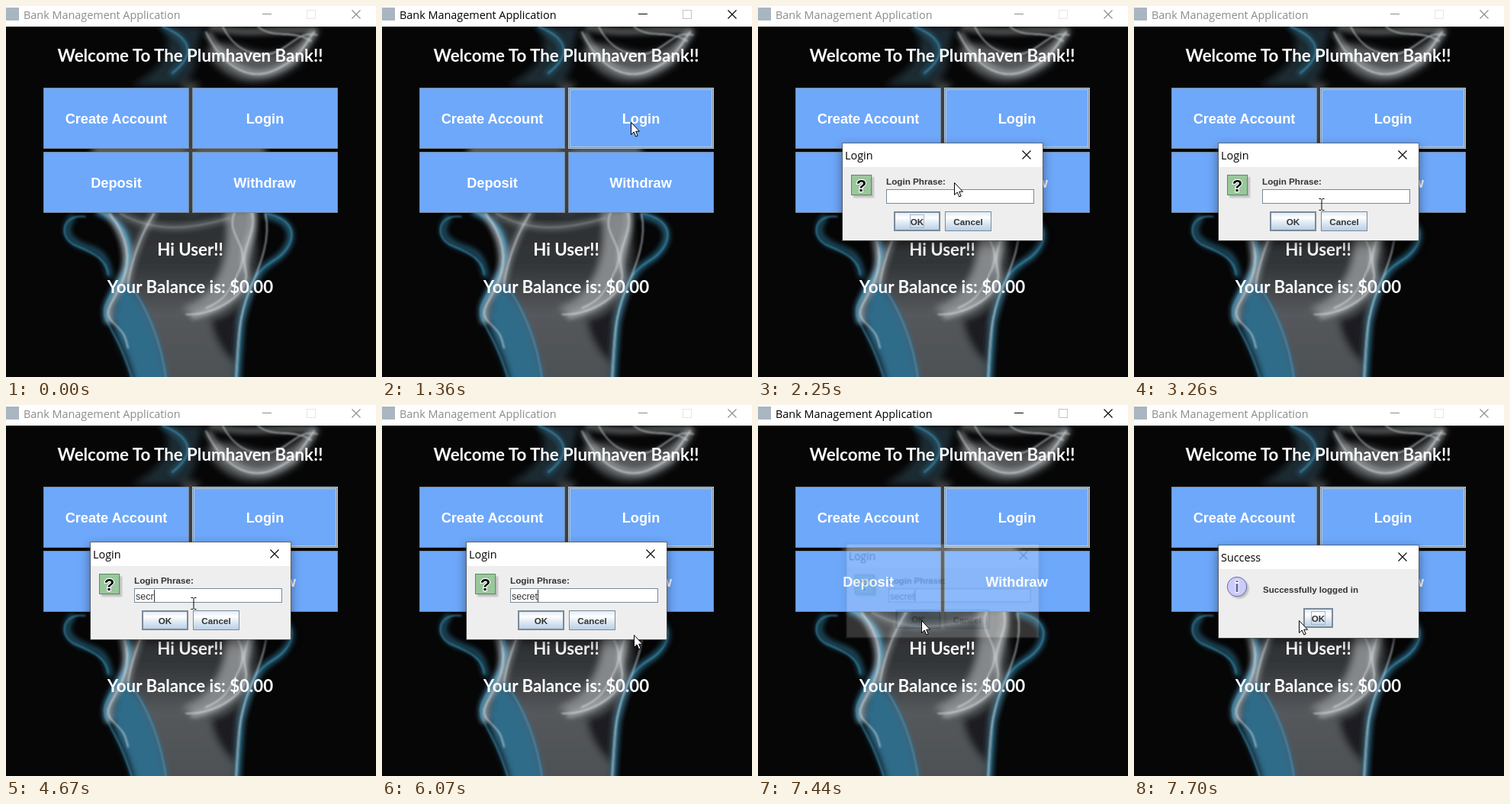
Recreate the animation shown at these times as an HTML page. Size 485 by 486 pixels, loop 8000 ms.

```html
<!DOCTYPE html>
<html lang="en">
<head>
<meta charset="utf-8">
<title>Bank Management Application</title>
<style>
  html, body { margin: 0; width: 100%; height: 100%; overflow: hidden; background: #000; }
  svg { display: block; width: 485px; height: 486px; }

  .ui { font: 14.4px "Open Sans", "Noto Sans", sans-serif; }
  .head { font: 700 22.3px Lato, sans-serif; fill: #fff; text-anchor: middle; }
  .btn { font: 700 18.2px "Liberation Sans", Arial, sans-serif; fill: #fff; text-anchor: middle; }
  .label { font: 700 11.7px "Liberation Sans", Arial, sans-serif; fill: #333; }
  .mid { text-anchor: middle; }
  .input { font: 12.5px "Liberation Sans", Arial, sans-serif; fill: #333; }
  .blue rect { fill: #6ea8fa; stroke: #7a8a99; }
  .line { fill: none; stroke: #7a8a99; }
  .pale { fill: none; stroke: #b8cfe5; }
  .focus { fill: none; stroke: #a3b8cc; }
  .x { fill: none; stroke: #000; stroke-width: 1.1; }
  .shade { filter: drop-shadow(0 5px 7px rgba(0, 0, 0, .5)); }

  /* One shared 8 s clock; every part moves in hard steps. */
  .t { animation: 8s step-end infinite; }
  #bar { animation-name: bar; }
  #max { animation-name: max; }
  #ring { animation-name: ring; }
  #login { animation-name: login; transform-origin: 242.5px 243.5px; }
  #done { animation-name: done; transform-origin: 242.5px 244.5px; }
  #type { animation-name: type; }
  #caret { animation-name: caret; }
  #okFocus { animation-name: okFocus; }
  #okPress { animation-name: okPress; }
  #over { animation-name: over; }
  #mouse { animation-name: mouse; }
  #arrow { animation-name: arrow; }
  #beam { animation-name: beam; }

  @keyframes bar {
    0%, 19.5%, 94.625%, 100% { color: #8c8c8c; }
    17%, 92% { color: #000; }
  }
  @keyframes max {
    0%, 19.5%, 94.625%, 100% { stroke: #e6e6e6; }
    17%, 92% { stroke: #c4c4c4; }
  }
  @keyframes ring { 0% { opacity: 0; } 10.125%, 100% { opacity: 1; } }
  @keyframes login {
    0%, 93.875%, 100% { opacity: 0; transform: scale(.94); }
    20.375% { opacity: .25; transform: scale(.95); }
    21.25% { opacity: .62; transform: scale(.977); }
    22.125% { opacity: .85; transform: scale(.99); }
    23% { opacity: .97; transform: scale(.998); }
    23.875% { opacity: 1; transform: none; }
    92% { opacity: .6; transform: scale(.98); }
    93% { opacity: .2; transform: scale(.962); }
  }
  @keyframes done {
    0% { opacity: 0; transform: scale(.94); }
    94.625% { opacity: .45; transform: scale(.965); }
    95.5% { opacity: .85; transform: scale(.99); }
    96.25%, 100% { opacity: 1; transform: none; }
  }
  @keyframes type {
    0% { transform: translateX(0); }
    47.375% { transform: translateX(7px); }
    51.5% { transform: translateX(14px); }
    54.875% { transform: translateX(20px); }
    58.375% { transform: translateX(24px); }
    60.875% { transform: translateX(31px); }
    62.5%, 100% { transform: translateX(34px); }
  }
  @keyframes caret {
    0%, 40.75%, 69.125%, 81.625% { opacity: 0; }
    34.875%, 47.375%, 75%, 87.75%, 100% { opacity: 1; }
  }
  @keyframes okFocus { 0%, 90.375%, 100% { opacity: 1; } 34.875% { opacity: 0; } }
  @keyframes okPress { 0% { opacity: 0; } 90.375%, 100% { opacity: 1; } }
  @keyframes over { 0%, 86%, 100% { opacity: 0; } 82.5% { opacity: 1; } }
  @keyframes mouse {
    0% { transform: translate(362px, 500px); }
    5.75% { transform: translate(362px, 470px); }
    6.625% { transform: translate(360px, 430px); }
    7.5% { transform: translate(356px, 370px); }
    8.375% { transform: translate(350px, 300px); }
    9.25% { transform: translate(342px, 235px); }
    10.125% { transform: translate(334px, 185px); }
    11% { transform: translate(328px, 160px); }
    11.875% { transform: translate(326px, 152px); }
    26.375% { transform: translate(312px, 172px); }
    27.25% { transform: translate(284px, 203px); }
    28.125% { transform: translate(257px, 231px); }
    29% { transform: translate(244px, 249px); }
    29.875% { transform: translate(238px, 262px); }
    30.75% { transform: translate(236px, 270px); }
    31.625% { transform: translate(236px, 272px); }
    32.5% { transform: translate(238px, 264px); }
    33.25% { transform: translate(241px, 258px); }
    34.875% { transform: translate(242px, 256px); }
    37.375% { transform: translate(244px, 258px); }
    38.25% { transform: translate(246px, 260px); }
    74.125% { transform: translate(262px, 268px); }
    75% { transform: translate(300px, 288px); }
    75.875% { transform: translate(330px, 301px); }
    80.875% { transform: translate(326px, 300px); }
    81.625% { transform: translate(316px, 297px); }
    82.5% { transform: translate(300px, 292px); }
    83.375% { transform: translate(282px, 289px); }
    84.25% { transform: translate(264px, 286px); }
    85.125% { transform: translate(248px, 284px); }
    86% { transform: translate(234px, 283px); }
    86.875% { transform: translate(224px, 282px); }
    87.75% { transform: translate(218px, 282px); }
    88.75% { transform: translate(215px, 282px); }
    90.375% { transform: translate(214px, 282px); }
    95.5%, 100% { transform: translate(216px, 282px); }
  }
  @keyframes arrow {
    0%, 29.875%, 74.125%, 100% { opacity: 1; }
    29%, 33.25% { opacity: 0; }
  }
  @keyframes beam {
    0%, 29.875%, 74.125%, 100% { opacity: 0; }
    29%, 33.25% { opacity: 1; }
  }
</style>
</head>
<body>
<svg viewBox="0 0 485 486">
  <defs>
    <filter id="soft" x="-20%" y="-20%" width="140%" height="140%"><feGaussianBlur stdDeviation="5"/></filter>
    <filter id="haze" x="-20%" y="-20%" width="140%" height="140%"><feGaussianBlur stdDeviation="3"/></filter>
    <filter id="thin" x="-20%" y="-20%" width="140%" height="140%"><feGaussianBlur stdDeviation=".8"/></filter>
    <linearGradient id="column" x2="0" y2="1">
      <stop offset="0" stop-color="#2a2d30"/>
      <stop offset=".35" stop-color="#34373a"/>
      <stop offset=".6" stop-color="#55585b"/>
      <stop offset="1" stop-color="#4c5053"/>
    </linearGradient>
    <linearGradient id="metal" x2="0" y2="1">
      <stop offset="0" stop-color="#dde8f3"/>
      <stop offset=".3" stop-color="#fff"/>
      <stop offset=".6" stop-color="#dde8f3"/>
      <stop offset="1" stop-color="#b8cfe5"/>
    </linearGradient>
  </defs>

  <!-- smoke backdrop -->
  <rect width="485" height="486" fill="#060607"/>
  <g filter="url(#soft)">
    <path d="M135 262H325C330 320 338 350 318 384C306 410 304 450 301 495H172C160 440 135 425 138 400C160 360 160 310 135 262Z" fill="url(#column)"/>
    <path d="M150 360C180 380 200 430 212 495H168C160 450 138 430 140 402Z" fill="#2f6c8a"/>
    <path d="M290 268H328C322 310 318 345 296 380C270 405 246 410 232 396C280 380 296 330 290 268Z" fill="#85888a"/>
    <path d="M268 410C290 405 300 395 308 385L300 470C280 450 270 430 268 410Z" fill="#1c1f21"/>
    <path d="M262 60C282 36 310 60 340 62S388 40 412 30L384 76C345 106 296 112 262 60Z" fill="#55585a"/>
    <path d="M205 27H262C240 50 262 78 232 104H165C200 85 225 60 205 27Z" fill="#1e2a31"/>
    <path d="M113 184H340V194H113Z" fill="#76797b"/>
    <path d="M232 100H252V270H232Z" fill="#3c4043"/>
  </g>
  <g fill="none" stroke-linecap="round">
    <g filter="url(#haze)" stroke-width="9">
      <g stroke="#3587aa">
        <path d="M122 270C162 284 170 322 152 354S128 394 133 412" opacity=".85"/>
        <path d="M86 278C70 300 90 312 110 318S132 336 136 352" opacity=".5"/>
        <path d="M342 274C388 284 376 318 350 334S318 374 308 414L303 490" opacity=".6"/>
        <path d="M205 27C244 44 244 66 218 88" opacity=".35"/>
      </g>
      <g stroke="#b9c0c4">
        <path d="M134 272C156 300 166 330 152 362S134 394 136 412" opacity=".6"/>
        <path d="M194 272C176 300 166 330 160 362" opacity=".4"/>
        <path d="M322 268C330 300 306 314 314 346S272 398 246 406" opacity=".55"/>
        <path d="M150 272C200 300 250 290 292 278" opacity=".3"/>
        <path d="M266 38C290 80 322 96 352 84S384 62 402 36" opacity=".5"/>
        <path d="M270 27C310 40 350 30 404 32" opacity=".4"/>
      </g>
    </g>
    <g filter="url(#thin)" stroke-width="1.6">
      <g stroke="#46a4cc" opacity=".8">
        <path d="M122 270C162 284 170 322 152 354S124 394 132 412 150 440 166 490"/>
        <path d="M160 362C184 392 204 440 210 490"/>
        <path d="M104 276C72 272 68 304 92 314S132 332 134 352"/>
        <path d="M342 272C390 282 378 318 350 334S316 374 308 414L303 490"/>
        <path d="M205 27C248 44 246 66 218 88"/>
      </g>
      <g stroke="#e2e6e8" opacity=".75">
        <path d="M136 272C158 300 166 330 152 362S126 400 140 414 156 430 160 448"/>
        <path d="M194 272C176 300 166 330 160 362"/>
        <path d="M322 268C330 300 306 314 314 346S272 406 236 404"/>
        <path d="M300 270C286 300 322 312 306 346S284 386 262 396"/>
        <path d="M340 272C348 306 332 342 318 376S304 440 301 490"/>
        <path d="M262 34C286 84 322 98 352 84S384 62 404 34"/>
        <path d="M284 27C304 66 340 70 362 56S388 34 408 38"/>
        <path d="M330 27C350 44 376 30 400 46"/>
        <path d="M150 272C200 300 250 290 292 278" opacity=".4"/>
      </g>
    </g>
  </g>

  <!-- main window -->
  <rect width="485" height="27" fill="#fff"/>
  <rect y="2" width="17" height="17" fill="#a9b5c0"/>
  <g id="bar" class="t" color="#8c8c8c">
    <text class="ui" x="23" y="17" fill="currentColor">Bank Management Application</text>
    <path d="M336 10.500H348M453.500 5.500L464.500 16.500M464.500 5.500L453.500 16.500" fill="none" stroke="currentColor" stroke-width="1.1"/>
  </g>
  <rect id="max" class="t" x="394.5" y="5.500" width="11" height="11" fill="none" stroke="#e6e6e6"/>

  <text class="head" x="241.5" y="73">Welcome To The Plumhaven Bank!!</text>
  <g class="blue">
    <rect x="49.5" y="107.5" width="190" height="79"/>
    <rect x="244.5" y="107.5" width="190" height="79"/>
    <rect x="49.5" y="191.5" width="190" height="79"/>
    <rect x="244.5" y="191.5" width="190" height="79"/>
  </g>
  <g id="ring" class="t">
    <rect class="pale" x="244.5" y="107.5" width="190" height="79"/>
    <rect class="line" x="245.5" y="108.5" width="188" height="77"/>
    <rect class="pale" x="246.5" y="109.5" width="186" height="75"/>
  </g>
  <g class="btn">
    <text x="144.5" y="154">Create Account</text>
    <text x="339.5" y="154">Login</text>
    <text x="144.5" y="238">Deposit</text>
    <text x="339" y="238">Withdraw</text>
  </g>
  <text class="head" x="241.5" y="327">Hi User!!</text>
  <text class="head" x="241.5" y="376">Your Balance is: $0.00</text>

  <!-- login dialog -->
  <g id="login" class="t">
    <rect class="shade" x="111" y="180" width="262" height="127" fill="#eee"/>
    <rect x="111" y="180" width="262" height="31" fill="#fff"/>
    <rect x="110.5" y="179.5" width="263" height="128" fill="none" stroke="#555" stroke-opacity=".7"/>
    <text class="ui" x="114" y="201">Login</text>
    <path class="x" d="M346.500 189.500L357.500 200.500M357.500 189.500L346.500 200.500"/>

    <rect x="125" y="224" width="27" height="27" fill="#000" opacity=".2" filter="url(#thin)"/>
    <rect x="122.5" y="221.5" width="26" height="26" fill="#99c79b" stroke="#5e8a60"/>
    <text class="mid" x="135.500" y="242.500" font-family="Liberation Sans, Arial, sans-serif" font-weight="700" font-size="22" stroke="#fff" stroke-width="2.4" paint-order="stroke">?</text>

    <text class="label" x="168" y="234">Login Phrase:</text>
    <rect x="168.5" y="240.5" width="193" height="18" fill="#fff" stroke="#7a8a99"/>
    <text class="input" x="170" y="255">secret</text>
    <g id="type" class="t">
      <rect x="170" y="242" width="40" height="16" fill="#fff"/>
      <rect id="caret" class="t" x="170" y="242" width="1" height="16" fill="#333"/>
    </g>

    <rect x="179" y="270" width="59" height="24" fill="url(#metal)" stroke="#7a8a99" stroke-width="2"/>
    <rect id="okPress" class="t" x="180" y="271" width="57" height="22" fill="#b8cfe5"/>
    <rect id="okFocus" class="t focus" x="199.5" y="273.5" width="18" height="17"/>
    <text class="label mid" x="208.5" y="287">OK</text>
    <rect x="245.5" y="269.5" width="60" height="25" fill="url(#metal)" stroke="#7a8a99"/>
    <g id="over" class="t">
      <rect class="pale" x="245.5" y="269.5" width="60" height="25"/>
      <rect class="line" x="246.5" y="270.5" width="58" height="23"/>
      <rect class="pale" x="247.5" y="271.5" width="56" height="21"/>
    </g>
    <text class="label mid" x="275.5" y="287">Cancel</text>
  </g>

  <!-- success dialog -->
  <g id="done" class="t">
    <rect class="shade" x="111" y="184" width="262" height="121" fill="#eee"/>
    <rect x="111" y="184" width="262" height="31" fill="#fff"/>
    <rect x="110.5" y="183.5" width="263" height="122" fill="none" stroke="#555" stroke-opacity=".7"/>
    <text class="ui" x="114" y="205">Success</text>
    <path class="x" d="M346.500 193.500L357.500 204.500M357.500 193.500L346.500 204.500"/>
    <circle cx="137.500" cy="240.500" r="13" fill="#000" opacity=".2" filter="url(#thin)"/>
    <circle cx="135" cy="238" r="12.700" fill="#ccccfc" stroke="#6d6da0"/>
    <text class="mid" x="135" y="245" font-family="Liberation Sans, Arial, sans-serif" font-weight="700" font-size="20" fill="#666699" stroke="#fff" stroke-width="2" paint-order="stroke">i</text>
    <text class="label" x="169" y="246" style="font-size:11.55px">Successfully logged in</text>
    <rect x="223" y="267" width="37" height="24" fill="url(#metal)" stroke="#7a8a99" stroke-width="2"/>
    <rect class="focus" x="232.5" y="270.5" width="18" height="17"/>
    <text class="label mid" x="241.5" y="284">OK</text>
  </g>

  <!-- pointer -->
  <g id="mouse" class="t">
    <path id="arrow" class="t" d="M.5.5V16.500L4.200 13 6.800 19 9.200 18 6.700 12.200H11.500Z" fill="#fff" stroke="#000"/>
    <path id="beam" class="t" d="M-3.500-7.500H-1L0-6.500 1-7.500H3.500M0-6.500V6.500M-3.500 7.500H-1L0 6.500 1 7.500H3.500" fill="none" stroke="#000"/>
  </g>
</svg>
</body>
</html>
```
